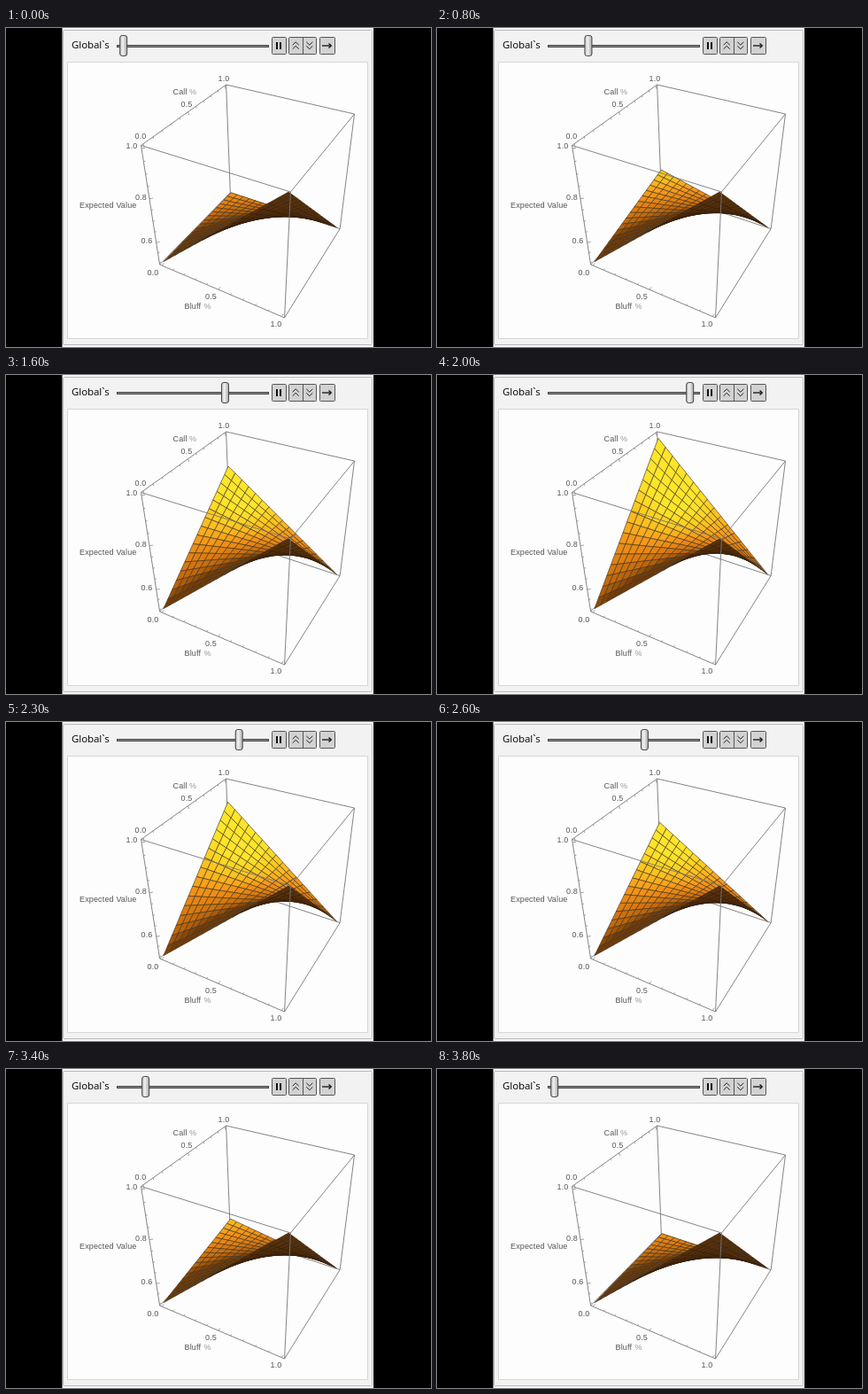
These frames come from a looping animation (480x360 px, 4.1 s). An HTML page with a canvas:

```html
<!DOCTYPE html>
<html lang="en">
<head>
<meta charset="utf-8">
<title>Expected value surface</title>
<style>
  html, body { margin: 0; width: 100%; height: 100%; overflow: hidden; background: #000; }
  canvas { display: block; width: 480px; height: 360px; }
</style>
</head>
<body>
<canvas id="stage" width="480" height="360"></canvas>
<script>
const ctx = document.getElementById('stage').getContext('2d');
const LOOP = 4100, STEP = 100, RATE = 0.0613;
const CELLS = 16, PAD = 0.021;

// Homogeneous basis of the perspective view: origin, bluff, call and value axes.
const ORIGIN = [173.6, 267, 1];
const BLUFF = [105.607, 23.258, -0.11236];
const CALL = [129.104, -44.988, 0.19503];
const VALUE = [-45.638, -155.836, -0.16103];

// Direction of the light, and the colours from shadow to highlight.
const LIGHT = [0.42, -0.34, 0.6];
const SHADES = [
  [0.28, [116, 58, 4]], [0.37, [186, 98, 10]], [0.5, [224, 126, 16]], [0.6, [244, 148, 24]],
  [0.66, [249, 172, 28]], [0.73, [253, 204, 32]], [0.785, [254, 229, 42]]
];

function project(x, y, z) {
  const [px, py, w] = ORIGIN.map((o, i) => o + x * BLUFF[i] + y * CALL[i] + z * VALUE[i]);
  return [px / w, py / w, w];
}

function sliderValue(time) {
  const n = Math.floor(time / STEP);
  if (n < 4 || n >= 38) return 0;
  if (n < 22) return Math.min(n - 4, 16) * RATE;
  return Math.max(0.015, 0.652 - (n - 26) * 0.0615);
}

function shade(light) {
  let i = 1;
  while (i < SHADES.length - 1 && light > SHADES[i][0]) i++;
  const [l0, c0] = SHADES[i - 1], [l1, c1] = SHADES[i];
  const k = Math.max(0, Math.min(1, (light - l0) / (l1 - l0)));
  return `rgb(${c0.map((c, j) => Math.round(c + (c1[j] - c) * k))})`;
}

function path(points, closed) {
  ctx.beginPath();
  points.forEach(([x, y]) => ctx.lineTo(x, y));
  if (closed) ctx.closePath();
}

function line(points, color = '#777', width = 0.9) {
  path(points);
  ctx.strokeStyle = color;
  ctx.lineWidth = width;
  ctx.stroke();
}

function roundBox(x, y, w, h, r, fill, stroke) {
  ctx.beginPath();
  ctx.roundRect(x, y, w, h, r);
  ctx.fillStyle = fill;
  ctx.fill();
  ctx.strokeStyle = stroke;
  ctx.lineWidth = 1;
  ctx.stroke();
}

function label(text, x, y, color = '#555') {
  ctx.fillStyle = color;
  ctx.fillText(text, x, y);
}

function edges(list) {
  for (const [from, to] of list) {
    line([from, to].map(corner => project(...[...corner].map(Number))));
  }
}

function drawSurface(s) {
  const height = (x, y) => x * (1 - y) + s * y * (1 - x);
  const inset = v => PAD + v * (1 - 2 * PAD);
  const at = (i, j) => {
    const x = i / CELLS, y = j / CELLS;
    return project(inset(x), inset(y), inset(height(x, y)));
  };
  const quads = [];
  for (let i = 0; i < CELLS; i++) {
    for (let j = 0; j < CELLS; j++) {
      const p = [at(i, j), at(i + 1, j), at(i + 1, j + 1), at(i, j + 1)];
      const x = (i + 0.5) / CELLS, y = (j + 0.5) / CELLS;
      const normal = [y + s * y - 1, x - s * (1 - x), 1];
      const light = normal.reduce((sum, v, k) => sum + v * LIGHT[k], 0) / Math.hypot(...normal);
      const area = (p[2][0] - p[0][0]) * (p[3][1] - p[1][1])
                 - (p[2][1] - p[0][1]) * (p[3][0] - p[1][0]);
      const depth = p.reduce((sum, v) => sum + v[2], 0);
      quads.push({ p, depth, front: area < 0, light });
    }
  }
  quads.sort((a, b) => b.depth - a.depth);
  ctx.lineJoin = 'round';
  for (const q of quads) {
    path(q.p, true);
    ctx.fillStyle = q.front ? shade(q.light) : '#55300c';
    ctx.fill();
    ctx.strokeStyle = q.front ? '#40341f' : '#38200a';
    ctx.lineWidth = 0.65;
    ctx.stroke();
  }
}

function drawTicks() {
  for (let i = 0; i <= 10; i++) {
    const v = PAD + (i / 10) * (1 - 2 * PAD);
    const len = i % 5 ? 2 : 3.5;
    const [bx, by] = project(v, 0, 0), [cx, cy] = project(0, v, 1), [vx, vy] = project(0, 0, v);
    line([[bx, by], [bx + len * 0.6, by - len * 0.8]], '#888', 0.8);
    line([[cx, cy], [cx + len * 0.3, cy + len]], '#888', 0.8);
    line([[vx, vy], [vx + (i % 4 === 2 ? 4 : 2), vy - 0.6]], '#888', 0.8);
  }
}

function drawLabels() {
  ctx.font = '9px "Liberation Sans", sans-serif';
  ctx.letterSpacing = '0.15px';
  [['1.0', 239.5, 59.5], ['0.5', 197.5, 88.5], ['0.0', 145.5, 125], ['1.0', 135.5, 136],
   ['0.8', 146, 194], ['0.6', 152.5, 243], ['0.0', 159.5, 279], ['0.5', 225, 306],
   ['1.0', 298.5, 337], ['Call', 188.5, 75], ['Bluff', 201.5, 316.5],
   ['Expected Value', 83, 203]].forEach(args => label(...args));
  label('%', 207, 75, '#999');
  label('%', 223.5, 316.5, '#999');
  ctx.letterSpacing = '0px';
}

function drawControls(s) {
  ctx.font = '11.5px "Noto Sans", sans-serif';
  ctx.letterSpacing = '-0.1px';
  label('Global`s', 74, 23, '#111');
  ctx.letterSpacing = '0px';

  ctx.fillStyle = '#444';
  ctx.fillRect(125, 19, 172, 3);
  ctx.fillStyle = '#8a8a8a';
  ctx.fillRect(126, 20, 170, 1);
  const x = 132.7 + 156 * s;
  const metal = ctx.createLinearGradient(x - 4, 0, x + 4, 0);
  metal.addColorStop(0, '#bbb');
  metal.addColorStop(0.4, '#f2f2f2');
  metal.addColorStop(1, '#a8a8a8');
  roundBox(x - 4, 8.5, 8, 23, 2.5, metal, '#444');

  [[300.5, 16], [319.5, 31], [354.5, 17]].forEach(([left, width]) =>
    roundBox(left, 10.5, width, 19, 1, '#d2d2d2', '#555'));
  line([[335.5, 11], [335.5, 29]], '#555', 1);
  ctx.fillStyle = '#111';
  ctx.fillRect(305, 16, 2, 8);
  ctx.fillRect(309, 16, 2, 8);
  const chevron = (cx, cy, dir) =>
    line([[cx - 3.5, cy + 1.7 * dir], [cx, cy - 1.7 * dir], [cx + 3.5, cy + 1.7 * dir]], '#222', 1);
  [17.5, 22].forEach(y => { chevron(327.2, y, 1); chevron(342.8, y, -1); });
  line([[357, 20], [367, 20]], '#111', 1.3);
  line([[364.5, 17.5], [367.3, 20], [364.5, 22.5]], '#111', 1.3);
}

function draw(time) {
  const s = sliderValue(time);
  ctx.fillStyle = '#000';
  ctx.fillRect(0, 0, 480, 360);
  ctx.fillStyle = '#f8f8f8';
  ctx.fillRect(63.5, 0, 351.5, 360);
  roundBox(64.5, 2.5, 349, 355, 1, '#f2f2f2', '#b8b8b8');
  roundBox(69.5, 38.5, 339, 312, 0, '#fdfdfd', '#d6d6d6');
  drawControls(s);

  // Corners are written as bluff, call and value digits.
  edges([['010', '011'], ['000', '010'], ['010', '110']]);
  drawSurface(s);
  edges([['001', '101'], ['101', '111'], ['111', '011'], ['011', '001'], ['001', '000'],
         ['000', '100'], ['100', '110'], ['110', '111'], ['101', '100']]);
  drawTicks();
  drawLabels();
}

const start = performance.now();
function tick(now) {
  draw(Math.max(0, now - start) % LOOP);
  requestAnimationFrame(tick);
}
tick(start);
</script>
</body>
</html>
```
